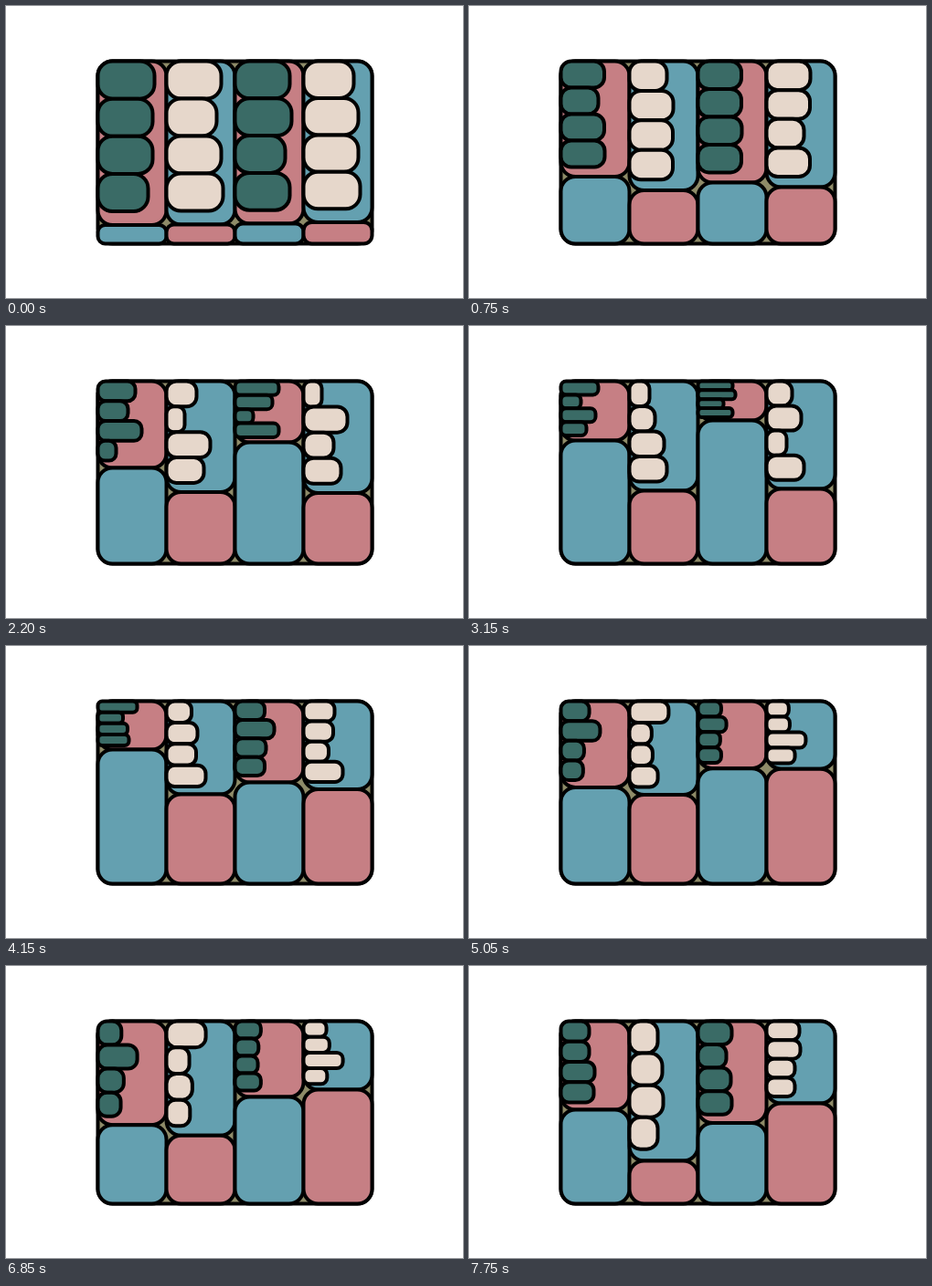
Write an HTML page with a canvas that moves like this. It is 500x320 px and loops after 7800 ms.

```html
<!DOCTYPE html>
<html lang="en">
<head>
<meta charset="utf-8">
<title>Breathing blocks</title>
<style>
  html, body { margin: 0; width: 100%; height: 100%; overflow: hidden; background: #fff; }
  canvas { display: block; }
</style>
</head>
<body>
<canvas id="stage" width="500" height="320"></canvas>
<script>
const ctx = document.getElementById('stage').getContext('2d');

const LOOP = 7800;
const X = 100.5, Y = 60.5, COL = 75, W = 300, H = 200;
const PINK = '#c67f84', BLUE = '#64a0b0', TEAL = '#3a6b66';
const CREAM = '#e6d7cb', OLIVE = '#8e8b68';

// Positions of the keys below, in steps of 75 ms
const KEYS = [0, 10, 29, 42, 55, 77, 103];

// Height of the upper panel in each column
const panels = [
  [179.5, 126.5, 95, 65, 53, 126, 97],
  [179, 141.5, 121.5, 120, 102, 104, 153],
  [178, 133, 67, 43, 89, 62, 111.5],
  [176.5, 138, 122.5, 118, 96.5, 64, 90]
].map(curve);

// Four bar widths, shared by all columns in different orders
const bars = {
  A: [62, 47.5, 41, 41, 43, 22, 31],
  B: [60, 41, 33, 22, 27.5, 52, 31],
  C: [60, 47.5, 48, 38, 32.5, 22, 37],
  D: [55, 48, 20, 28, 34, 17, 36]
};
for (const k in bars) bars[k] = curve(bars[k]);
const orders = ['ABCD', 'BDCA', 'CADC', 'DCBA'];

// Monotone cubic through the keys
function curve(v) {
  const last = KEYS.length - 1;
  const d = [];
  for (let i = 0; i < last; i++) d.push((v[i + 1] - v[i]) / (KEYS[i + 1] - KEYS[i]));
  const m = v.map((_, i) => {
    if (i === 0) return d[0];
    if (i === last) return d[last - 1];
    const a = d[i - 1], b = d[i];
    return a * b > 0 ? 2 * a * b / (a + b) : 0;
  });
  return n => {
    let i = 0;
    while (i < last - 1 && n >= KEYS[i + 1]) i++;
    const h = KEYS[i + 1] - KEYS[i];
    const s = (n - KEYS[i]) / h, r = 1 - s;
    return v[i] * (1 + 2 * s) * r * r + m[i] * h * s * r * r +
      v[i + 1] * s * s * (3 - 2 * s) - m[i + 1] * h * s * s * r;
  };
}

function box(x, y, w, h, fill) {
  ctx.beginPath();
  ctx.roundRect(x, y, w, h, Math.min(16, Math.min(w, h) * 0.39));
  ctx.fillStyle = fill;
  ctx.fill();
  ctx.stroke();
}

function draw(n) {
  ctx.fillStyle = '#fff';
  ctx.fillRect(0, 0, 500, 320);
  ctx.strokeStyle = '#000';
  ctx.lineWidth = 4;
  box(X, Y, W, H, OLIVE);
  orders.forEach((order, c) => {
    const x = X + c * COL, top = panels[c](n), odd = c % 2;
    box(x, Y, COL, top, odd ? BLUE : PINK);
    box(x, Y + top, COL, H - top, odd ? PINK : BLUE);
    const h = top * 11 / 48;
    [...order].forEach((k, i) => box(x, Y + i * h, bars[k](n), h, odd ? CREAM : TEAL));
  });
}

// Steps last 100 ms and 50 ms in turn
function stepAt(t) {
  return 2 * Math.floor(t / 150) + (t % 150 >= 100 ? 1 : 0);
}

const start = performance.now();
function tick() {
  draw(stepAt((performance.now() - start) % LOOP));
  requestAnimationFrame(tick);
}
tick();
</script>
</body>
</html>
```
